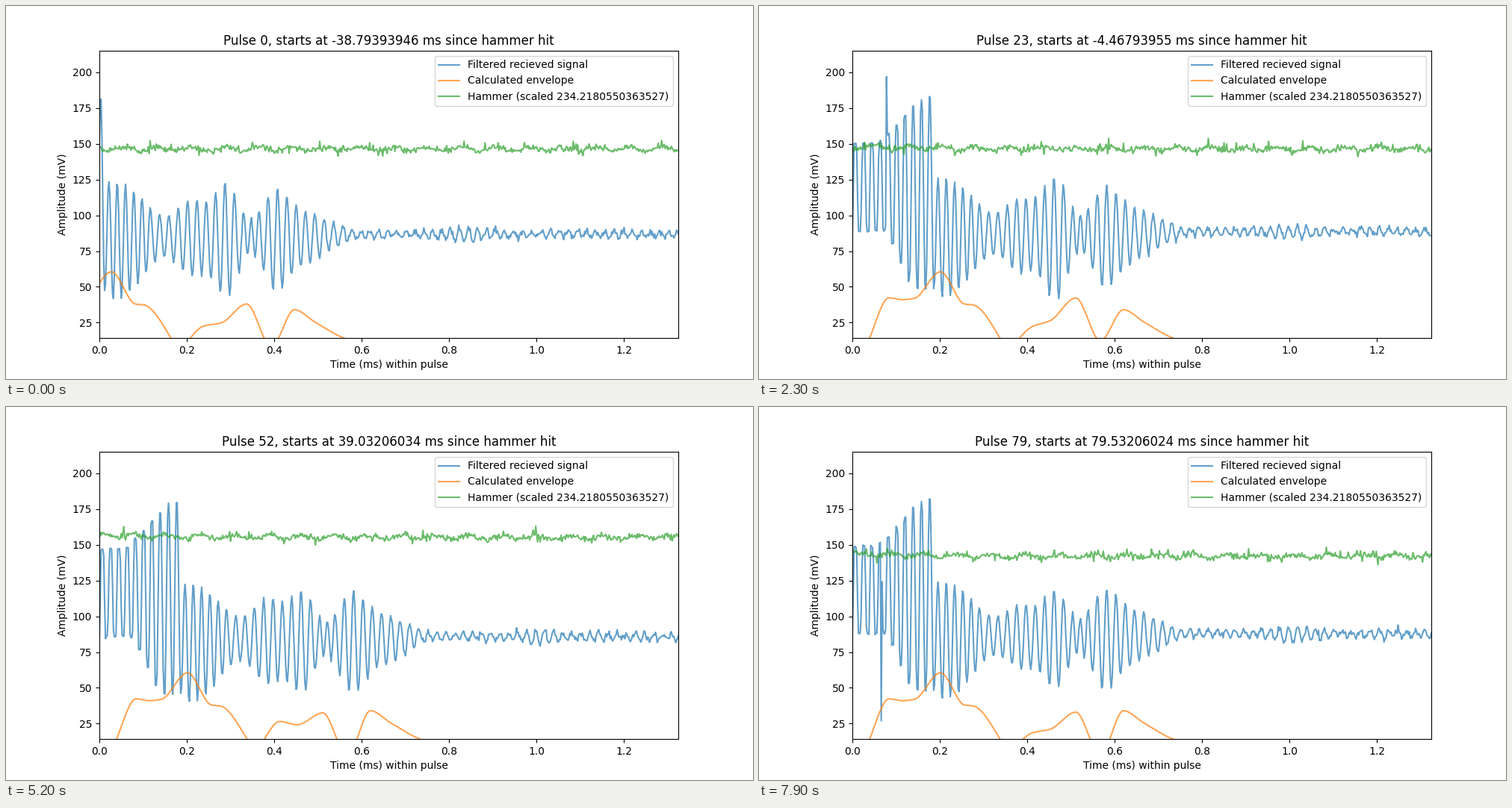
Recreate the animation shown at these times as a matplotlib script. Size 1000x500 px, loop 8 s.

```python
import numpy as np
import matplotlib.pyplot as plt
from matplotlib.animation import FuncAnimation

PULSES = 80
HIT = 26                        # first pulse after the hammer hit
DT = 0.002
T_MAX = 1.324
LEFT, SCALE = 125, 775 / T_MAX  # shapes are described in stage pixels
t = np.arange(663) * DT

# pulse, baseline (mV), strength of the early and of the late echo
MOOD = np.array([(14, 87, 22.5, 38), (31, 90.5, 22, 46), (44, 88, 31, 32),
                 (52, 86, 26.5, 32.5), (64, 87.5, 16, 46), (79, 88, 18.5, 33)])

# Carrier: where the k-th crest falls
CRESTS = np.array([(0, 129), (15, 295), (17, 320), (25, 420), (27, 440.5),
                   (37, 565), (53, 757), (76, 1038)])
crest_x = np.interp(np.arange(77), *CRESTS.T)
turn_x = np.empty(154)          # trough, crest, trough, ...
turn_x[0] = 123.5
turn_x[1::2] = crest_x
turn_x[2::2] = (crest_x[1:] + crest_x[:-1]) / 2
is_crest = np.arange(154) % 2 == 1


def mood(n):
    return [np.interp(n, MOOD[:, 0], col) for col in MOOD.T[1:]]


def bump(x, centre, width):
    return np.exp(-((x - centre) / width) ** 2)


def ramp(x, start, end):
    u = np.clip((x - start) / (end - start), 0, 1)
    return u * u * (3 - 2 * u)


def pchip(x, xs, ys):
    """Smooth curve that is flat at the local extremes of its points."""
    h, d = np.diff(xs), np.diff(ys) / np.diff(xs)
    m = np.zeros(len(xs))
    same = d[1:] * d[:-1] > 0
    m[1:-1][same] = 2 / (1 / d[1:][same] + 1 / d[:-1][same])
    m[0], m[-1] = d[0], d[-1]
    i = np.clip(np.searchsorted(xs, x, side="right") - 1, 0, len(h) - 1)
    u = (x - xs[i]) / h[i]
    return (ys[i] + (ys[i + 1] - ys[i]) * u * u * (3 - 2 * u)
            + h[i] * u * (1 - u) * ((1 - u) * m[i] - u * m[i + 1]))


def stage_x(n):
    late_start = 0.174 if n == 0 else 0
    return LEFT + SCALE * (t + late_start)


def turning_points(early, late):
    """Crest and trough offsets: a driven burst, its ringing, then echoes."""
    x = turn_x
    ring = (40 * np.exp(-(np.maximum(x - 245, 0) / 56) ** 2.4)
            + (early + 2) * bump(x, 352, 30) + 0.96 * late * bump(x, 398, 22)
            + 29 * bump(x, 462, 25) + 15 * bump(x, 505, 40)
            + 2.3 + 3 * bump(x, 715, 28))
    up = np.where(x < 232, 61 + 33 * ramp(x, 151, 228), 0.87 * ring)
    down = np.where(x < 237, 40 * ramp(x, 165, 212), 1.08 * ring)
    return np.where(is_crest, up, -down)


def echo(n, rng):
    x = stage_x(n)
    base, early, late = mood(n)
    ys = turning_points(early, late)
    i = np.searchsorted(turn_x, x, side="right") - 1
    u = (x - turn_x[i]) / (turn_x[i + 1] - turn_x[i])
    steep = np.interp(x, [165, 200, 240], [1.7, 1.2, 1])  # clipped at first
    w = np.clip(0.5 - 0.5 * steep * np.cos(np.pi * u), 0, 1)
    y = base + ys[i] + (ys[i + 1] - ys[i]) * w
    y += rng.normal(0, 1, len(x)) * np.interp(x, [300, 600], [0.6, 1.1])
    if n and rng.random() < 0.6:                          # stray sample
        y[rng.integers(5, 65)] = rng.choice([27, 166, 197])
    return y


def envelope(n):
    _, a, b = mood(n)
    points = np.array([
        (115, -38), (148, 14), (174, 42.3), (192, 41), (208, 42), (243, 60.5),
        (275, 38), (287, 37.3), (323, 14), (335, 0), (349, 0.64 * a), (366, a),
        (390, 0.41 * (a + b)), (424, b), (457, b - 30), (488, 34),
        (515, 25.5), (555, 14), (650, 0), (1030, -5)])
    return pchip(stage_x(n), *points.T)


def hammer(n, rng):
    level = 146.4
    if n >= HIT:
        level = 158 - 16 * ((n - HIT) / (PULSES - 1 - HIT)) ** 2.5
    y = level + 1.3 * np.sin(2 * np.pi * (t / 0.077 + rng.random()))
    y += rng.normal(0, 1.05, len(t))
    y += (rng.random(len(t)) < 0.05) * rng.choice([-3.5, 3, 4.5], len(t))
    if n:
        y += 1.8 * np.exp(-t / 0.15)
    return y


def title(n):
    start = -17.967939516 + (1.5 - 3.8e-9) * (n - 14)
    if n == 0:
        start += 0.174
    return f"Pulse {n}, starts at {round(start, 8)} ms since hammer hit"


fig, ax = plt.subplots(figsize=(10, 5), dpi=100)
blue, = ax.plot(t, t, alpha=0.7, label="Filtered recieved signal")
orange, = ax.plot(t, t, alpha=0.7, label="Calculated envelope")
green, = ax.plot(t, t, alpha=0.7, label="Hammer (scaled 234.2180550363527)")
ax.set_xlim(0, T_MAX)
ax.set_ylim(14.25, 215.1)
ax.set_xlabel("Time (ms) within pulse")
ax.set_ylabel("Amplitude (mV)")
ax.legend(loc="upper right")
heading = ax.set_title(title(0))


def update(n):
    rng = np.random.default_rng(100 + n)
    blue.set_ydata(echo(n, rng))
    orange.set_ydata(envelope(n))
    green.set_ydata(hammer(n, rng))
    heading.set_text(title(n))
    return blue, orange, green, heading


anim = FuncAnimation(fig, update, frames=PULSES, interval=100, repeat=True,
                     repeat_delay=0, blit=False)
plt.show()
```
